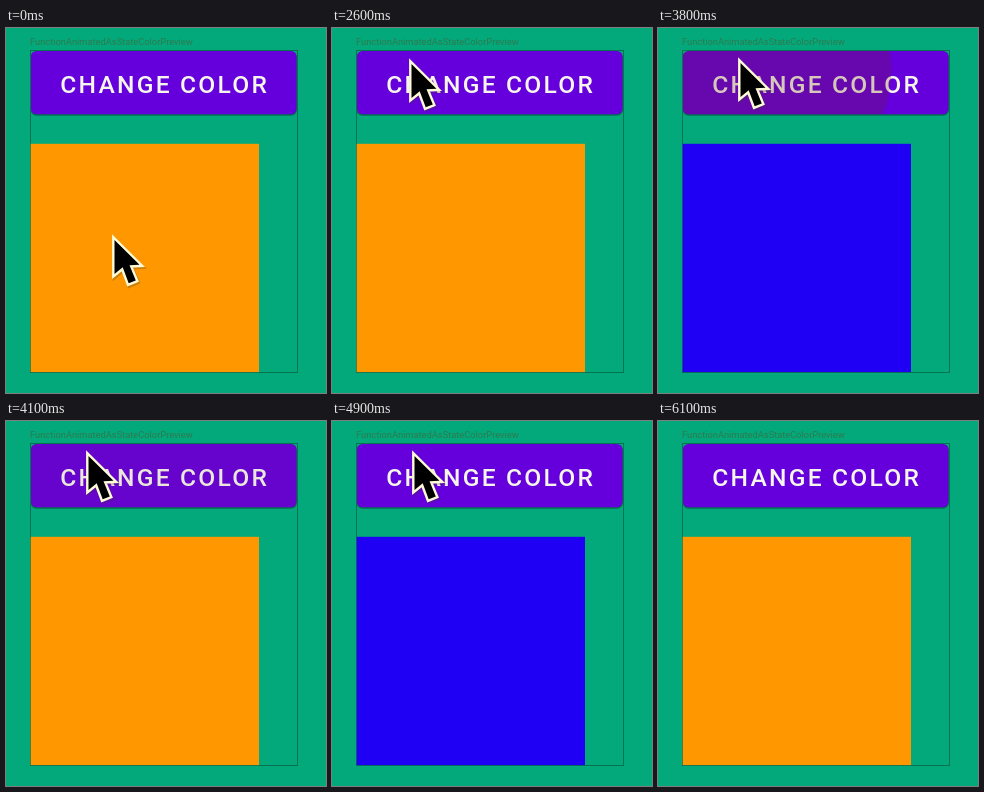
Write an HTML page that moves like this. It is 320 px wide and 365 px high and loops after 6.2 s.

```html
<!DOCTYPE html>
<html lang="en">
<head>
<meta charset="utf-8">
<title>Change color</title>
<style>
  html, body { margin: 0; width: 100%; height: 100%; overflow: hidden; background: #03a97a; }
  svg { display: block; width: 100vw; height: 100vh; }
  text { font-family: Roboto, sans-serif; }
  .title { font-size: 9.3px; fill: #2f7a50; }
  .label { font-size: 24.6px; font-weight: 500; letter-spacing: 2.2px; fill: #f5f5ec; }
</style>
</head>
<body>
<svg viewBox="0 0 320 365" preserveAspectRatio="none">
  <defs>
    <clipPath id="buttonClip"><rect x="25" y="23" width="265.5" height="63.3" rx="5.5"/></clipPath>
    <path id="arrow" d="M1.5 5V39L9.7 32.3L15.7 48.3L22.8 45.4L16.5 30.3L26.5 29.8Z"/>
  </defs>
  <rect width="320" height="365" fill="#03a97a"/>
  <text class="title" x="24" y="17">FunctionAnimatedAsStateColorPreview</text>

  <rect x="24.5" y="23.5" width="266.5" height="64.3" rx="6" fill="#05583f" opacity=".7"/>
  <g clip-path="url(#buttonClip)">
    <rect x="24" y="23" width="268" height="64" fill="#6500dc"/>
    <text class="label" x="54.3" y="65.3">CHANGE COLOR</text>
    <circle id="ripple" fill="#6c280f" opacity="0"/>
  </g>

  <rect x="24.5" y="22.5" width="267" height="322" fill="none" stroke="#067350"/>
  <rect id="box" x="24.7" y="115.8" width="228.3" height="228.3"/>

  <g id="cursor" stroke-linejoin="miter">
    <use href="#arrow" transform="translate(1 1.5)" fill="none" stroke="#3a3a20" stroke-width="5.5" opacity=".25"/>
    <use href="#arrow" fill="#000" stroke="#fffbd8" stroke-width="4.8" paint-order="stroke"/>
  </g>
</svg>
<script>
  const LOOP = 6200, STEP = 100;
  const ORANGE = '#ff9700', BLUE = '#1f00f5';
  const presses = [2840, 3720, 4270, 4910];
  const RELEASE = 120;      // press to colour toggle
  const GROW = 225, FADE_AT = 260, FADE = 180;

  // [start, end, from, bend, to]
  const moves = [
    [720, 1300, [107, 207], [118, 140], [117, 68]],
    [2030, 2600, [117, 68], [95, 34], [78, 31]],
    [2600, 2700, [78, 31], [80, 30], [81, 30]]
  ];
  const HIDE_AT = 5400;

  const $ = id => document.getElementById(id);
  const ripple = $('ripple'), box = $('box'), cursor = $('cursor');
  const clamp = v => Math.min(1, Math.max(0, v));
  const mix = (a, b, k) => a + (b - a) * k;
  const smooth = k => k * k * (3 - 2 * k);

  function cursorAt(t) {
    let move = moves[0];
    for (const m of moves) if (t >= m[0]) move = m;
    const [start, end, from, bend, to] = move;
    const k = smooth(clamp((t - start) / (end - start)));
    return [0, 1].map(i => mix(mix(from[i], bend[i], k), mix(bend[i], to[i], k), k));
  }

  function drawRipple(t) {
    const press = presses.filter(p => p <= t).pop();
    const age = press === undefined ? Infinity : t - press;
    const k = smooth(clamp(age / GROW + 0.145));
    const alpha = clamp(age / 80) * (1 - clamp((age - FADE_AT) / FADE));
    ripple.setAttribute('cx', mix(81, 157.5, k));
    ripple.setAttribute('cy', mix(30, 55, k));
    ripple.setAttribute('r', mix(80, 148, k));
    ripple.setAttribute('opacity', 0.22 * alpha);
  }

  function draw(t) {
    const clicks = presses.filter(p => t >= p + RELEASE).length;
    box.setAttribute('fill', clicks % 2 ? BLUE : ORANGE);
    drawRipple(t);
    cursor.setAttribute('transform', `translate(${cursorAt(t)})`);
    cursor.setAttribute('visibility', t < HIDE_AT ? 'visible' : 'hidden');
  }

  const begin = performance.now();
  function tick() {
    const t = (performance.now() - begin) % LOOP;
    draw(Math.floor(t / STEP) * STEP);
    requestAnimationFrame(tick);
  }
  tick();
</script>
</body>
</html>
```
